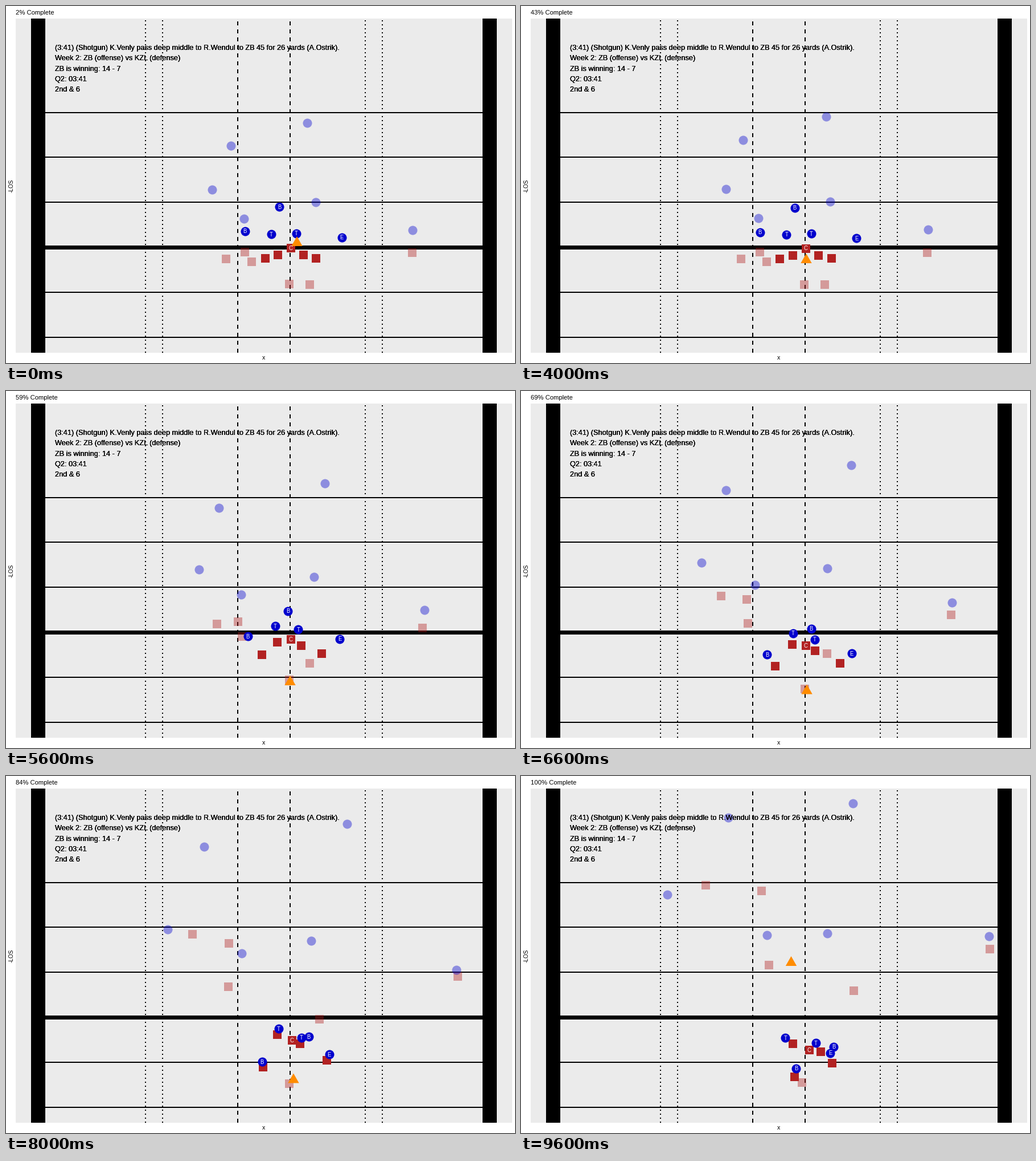
Write a matplotlib script that moves like this. It is 894x626 px and loops after 9800 ms.

```python
import matplotlib.pyplot as plt
import numpy as np
from matplotlib.animation import FuncAnimation
from matplotlib.patches import Polygon, Rectangle

W, H, DPI = 894, 626, 64
PT = 72 / DPI                      # points per pixel
FRAMES, STEP_MS = 49, 200
HOLD_START, HOLD_END = 6, 18       # the play pauses between these frames
MID, END = 25, 36                  # play times of a runner's two later points
ROUTE_END = 21.3                   # play time reached by the rush arrows

BLUE, RED, ORANGE = "#0000CD", "#B22222", "#FF8C00"
SKY, GREEN, PANEL = "#1E90FF", "#228B22", "#EBEBEB"

plt.rcParams["font.family"] = "Liberation Sans"


def runner(start, mid, end, go=HOLD_START, creep=0):
    """Stand (or creep) until `go`, then leave from rest through mid and end.

    The run is start + a s^2 + b s^3, with s the time since `go`.
    """
    start, mid, end = (np.array(p, float) for p in (start, mid, end))
    s1, s2 = MID - go, END - go
    k1, k2 = (mid - start) / s1 ** 2, (end - start) / s2 ** 2
    b = (k2 - k1) / (s2 - s1)
    a = k1 - b * s1

    def at(now):
        s = now - go
        if s < 0:
            return start + creep * (mid - start) * s / go
        return start + a * s ** 2 + b * s ** 3

    return at


def stance(i):
    """Spot of lineman i (centre is 0) in the wedge behind the ball."""
    return 500 + 22.4 * i, 424 + 12.4 * abs(i) ** 0.5


SAFETIES = [
    runner((391.5, 236), (352, 146), (364, 73), creep=0.1),
    runner((535.5, 195.5), (593.5, 103), (583, 48), creep=0.1),
]
COVERAGE = [
    runner((362, 321.5), (298.5, 285), (257, 208)),
    runner((418, 372.5), (412, 324), (432.5, 278.5)),
    runner((544, 343.5), (537, 297.5), (538, 276)),
    runner((714, 392.5), (777, 355.5), (822.5, 281.5)),
]
RUSHERS = [
    runner((480.5, 352), (523, 441.5), (549.5, 475)),
    runner((420, 395), (441.5, 486.5), (483.5, 512.5)),
    runner((466.5, 400), (480, 435.5), (465, 459.5)),
    runner((510.5, 398.5), (518.5, 450), (518.5, 468)),
    runner((590, 405.5), (574.5, 478.5), (543.5, 485.5)),
]
BLOCKS = [
    ((448, 498.5), (480, 527)),
    ((476, 449), (477.5, 468.5)),
    ((501.5, 456), (506, 480)),
    ((515.5, 463), (526, 483)),
    ((563.5, 490), (546.5, 502.5)),
]
LINEMEN = [runner(stance(i - 2), *block) for i, block in enumerate(BLOCKS)]
RECEIVERS = [
    runner((386, 443), (336.5, 313), (324.5, 190.5), go=8),
    runner((419, 430.5), (391.5, 325.5), (422, 201), go=8),
    runner((431.5, 447.5), (390.5, 385.5), (435, 330.5), go=8),
    runner((533.5, 488), (543, 441.5), (584, 376), go=8),
    runner((713, 432), (777.5, 369), (823.5, 303), go=8),
]
PASSER = [runner((497, 487), (498, 533), (493.5, 536.5))]


def ball_at(now):
    """Snap, hand-held drop back, then the throw."""
    t = [0, 8, 13, 16, 25, 32, 36]
    x = [511, 501, 500, 499, 504.5, 505.5, 474.5]
    y = [413, 443, 497, 508, 536, 523, 325]
    return np.array([np.interp(now, t, x), np.interp(now, t, y)])


fig = plt.figure(figsize=(W / DPI, H / DPI), dpi=DPI, facecolor="white")
ax = fig.add_axes([0, 0, 1, 1])
ax.set_xlim(0, W)
ax.set_ylim(H, 0)
ax.axis("off")


def box(x0, y0, x1, y1, color, z):
    patch = Rectangle((x0, y0), x1 - x0, y1 - y0, fc=color, lw=0, zorder=z)
    return ax.add_patch(patch)


def line(xs, ys, width, color="black", z=2, **kw):
    return ax.plot(xs, ys, color=color, lw=width * PT, zorder=z,
                   solid_capstyle="butt", dash_capstyle="butt", **kw)[0]


def label(x, y, text, size, color="black", z=9, **kw):
    kw = {"ha": "center", "va": "baseline", **kw}
    return ax.text(x, y, text, fontsize=size * PT, color=color, zorder=z, **kw)


def arrow(points, color, width, z):
    """Polyline with an open head at its end."""
    pts = np.array(points)
    tip = pts[-1]
    back = pts[-2] - tip
    angle = np.arctan2(back[1], back[0])
    barbs = [tip + 11 * np.array([np.cos(a), np.sin(a)])
             for a in (angle - np.pi / 6, angle + np.pi / 6)]
    head = np.array([barbs[0], tip, barbs[1]])
    return [line(*part.T, width, color, z, solid_joinstyle=join)
            for part, join in ((pts, "miter"), (head, "round"))]


def team(paths, shape, size, color, alpha, z, letters=""):
    dots = ax.plot([], [], shape, ms=size * PT, mew=0, color=color,
                   alpha=alpha, zorder=z)[0]
    tags = [label(0, 0, c, 9.5, "white", 8, va="center") for c in letters]
    return paths, dots, tags


# Field
box(17, 22, 889, 608, PANEL, 0)
for i in range(6):
    y = round(186.6 + 78.88 * i)
    line([69, 837], [y, y], 2)
box(69, 420, 837, 427, "black", 2)
DASHED, DOTTED = (3.5, 3.5), (1, 2.5)
for offset, dash in ((46, DASHED), (178, DOTTED), (208, DOTTED)):
    for x in (453 - offset, 453 + offset):
        line([x, x], [608, 22], 2, ls=(0, dash))
for x in (44, 837):
    box(x, 22, x + 25, 608, "black", 3)

# Captions
NOTES = [
    "(3:41) (Shotgun) K.Venly pass deep middle to R.Wendul to ZB 45 for 26 yards (A.Ostrik).",
    "Week 2: ZB (offense) vs KZL (defense)",
    "ZB is winning: 14 - 7",
    "Q2: 03:41",
    "2nd & 6",
]
for row, note in enumerate(NOTES):
    for _ in range(3):             # overprinting gives the heavy look
        label(85.5, 77 + 18.35 * row, note, 12.72, ha="left")
title = label(17, 15, "", 11.3, ha="left")
label(452.5, 620, "x", 10.5)
label(10, 315.5, "-LOS", 10, rotation=90, va="center")

# Players and ball
teams = [
    team(RECEIVERS + PASSER, "s", 15, RED, 0.4, 4),
    team(SAFETIES + COVERAGE, "o", 16, BLUE, 0.4, 4.5),
    team(LINEMEN, "s", 15, RED, 1, 5, "  C  "),
    team(RUSHERS, "o", 16, BLUE, 1, 7, "BBTTE"),
]
BALL_SHAPE = np.array([[0, -9], [-9.7, 8], [9.7, 8]])
ball = ax.add_patch(Polygon(BALL_SHAPE, fc=ORANGE, lw=0, zorder=7.5))

# Blocking and rush arrows shown during the pause
overlay = []
for i, path in enumerate(LINEMEN):
    x, y = path(HOLD_START)
    side, color = (23, GREEN) if i == 4 else (-23, SKY)
    overlay += arrow([(x, y), (x, y + 40), (x + side, y + 40)], color, 4, 4.8)
for path in RUSHERS:
    route = [path(t) for t in np.linspace(HOLD_START, ROUTE_END, 24)]
    overlay += arrow(route, BLUE, 3.2, 7.6)
for x0, x1, text, color in ((339, 424, "Zone Side", SKY), (579, 659, "Man Side", GREEN)):
    overlay.append(box(x0, 478, x1, 497, color, 8))
    overlay.append(label((x0 + x1) / 2, 494, text, 17.2, "white"))


def draw(k):
    now = k if k <= HOLD_START else max(HOLD_START, k - (HOLD_END - HOLD_START))
    title.set_text(f"{round(100 * (k + 1) / FRAMES)}% Complete")
    for paths, dots, tags in teams:
        spots = np.array([path(now) for path in paths]) - (0.5, 0)
        dots.set_data(*spots.T)
        for tag, spot in zip(tags, spots):
            tag.set_position(spot + (0, 0.5))
    ball.set_xy(BALL_SHAPE + ball_at(now))
    for art in overlay:
        art.set_visible(HOLD_START <= k <= HOLD_END)


anim = FuncAnimation(fig, draw, frames=FRAMES, interval=STEP_MS,
                     init_func=lambda: draw(0), repeat=True)
plt.show()
```
